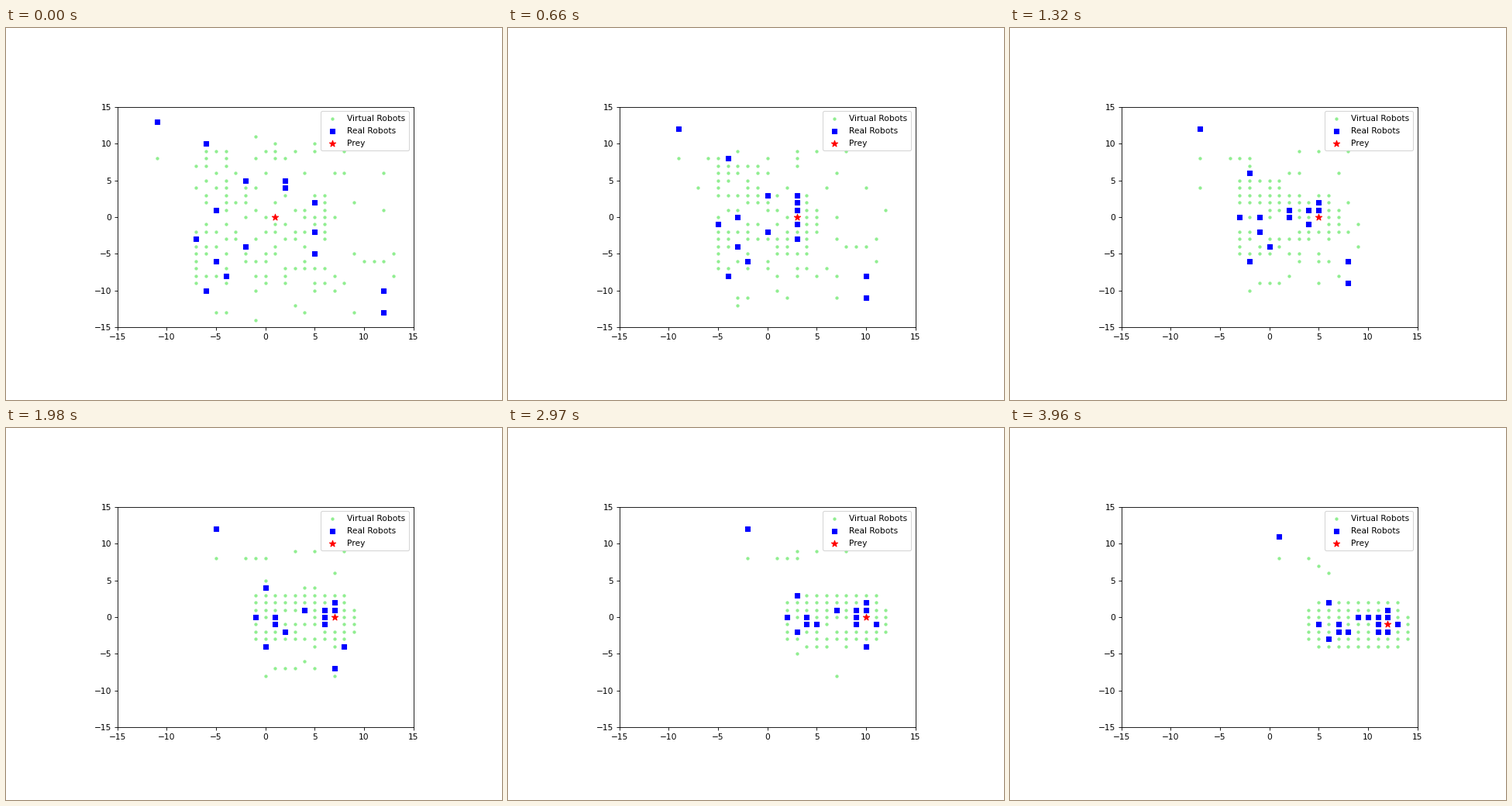
These frames come from a looping animation (640 by 480 pixels, 5950 ms). A matplotlib script:

```python
import matplotlib.pyplot as plt
import numpy as np
from matplotlib.animation import FuncAnimation

LOOP_MS = 5950
TICK_MS = 25
STEP_MS = 330
LAST = 12
S = 0.77  # the plot is drawn smaller than its default size

# Real robots: where they set out, and where they close in
ROBOT_START = [(-11, 13), (-6, 10), (-2, 5), (2, 5), (2, 4), (5, 2), (-5, 1),
               (5, -2), (5, -5), (-7, -3), (-2, -4), (-5, -6), (-4, -8),
               (-6, -10), (12, -10), (12, -13)]
ROBOT_END = [(1, 11), (6, 2), (9, 0), (12, 0), (12, 1), (11, 0), (7, -1),
             (11, -2), (11, -1), (5, -1), (10, 0), (7, -2), (8, -2),
             (6, -3), (13, -1), (12, -2)]

# Virtual robots that wait before they join the others
WAITING = [(3, 9), (5, 9), (8, 9), (7, 6), (7, -8), (12, 1), (-7, 4)]


def prey_at(k):
    return np.array([min(1 + k, 12), -1 if k == LAST else 0])


def grid(x0, x1, y0, y1):
    xs, ys = np.meshgrid(np.arange(x0, x1 + 1), np.arange(y0, y1 + 1))
    return np.column_stack([xs.ravel(), ys.ravel()])


def scattered(rng):
    """A busy middle with a thin scatter around it."""
    cells = grid(-7, 13, -14, 11)
    x, y = cells.T
    chance = np.where((x <= 6) & (np.abs(y) <= 9), 0.45, 0.08)
    return cells[rng.random(len(cells)) < chance]


def gathered(rng):
    """A rounded block of cells around the caught prey."""
    cells = grid(4, 14, -5, 3)
    x, y = cells.T
    inside = np.abs((x - 9) / 5.5) ** 4 + np.abs((y + 0.8) / 3.7) ** 4 < 1
    return cells[inside & (rng.random(len(cells)) < 0.9)]


def pick_slots(dots, slots):
    """Give each dot a near slot, spreading the dots over all slots."""
    used = np.zeros(len(slots))
    shift = prey_at(LAST) - prey_at(0)
    picked = []
    for dot in dots:
        gap = np.abs(slots - shift - dot).max(axis=1)
        best = np.argmin(gap + 4 * used)
        used[best] += 1
        picked.append(slots[best])
    return np.array(picked)


def chase(start, end):
    """Walk one cell per step towards a fixed place beside the moving prey."""
    pos, end = np.array(start), np.array(end)
    track = [pos]
    for k in range(1, LAST + 1):
        goal = end + prey_at(k) - prey_at(LAST)
        pos = pos + np.clip(goal - pos, -1, 1)
        track.append(pos)
    return track


def convoy_at(k):
    """The file of dots that trails in from the upper left."""
    gaps = (0, 1, 2, 5) if k > 1 else (0, 5)
    return [(k - 6 - g, min(8, 18 - k + g)) for g in gaps]


rng = np.random.default_rng(7)
swarm = scattered(rng)
SWARM = chase(swarm, pick_slots(swarm, gathered(rng)))
ROBOTS = chase(ROBOT_START, ROBOT_END)


def virtual_at(k):
    # the farther from the prey's row, the longer a dot waits
    waiting = [(x, y) for x, y in WAITING if k <= abs(y) + 1]
    return np.unique(np.vstack([SWARM[k], convoy_at(k)] +
                               ([waiting] if waiting else [])), axis=0)


plt.rcParams.update({
    "font.family": "DejaVu Sans",
    "font.size": 10 * S,
    "axes.linewidth": 0.8 * S,
    "patch.linewidth": 1.0 * S,
})

fig = plt.figure(figsize=(6.4, 4.8), dpi=100, facecolor="white")
ax = fig.add_axes([143.6 / 640, 93.7 / 480, 381.9 / 640, 284.6 / 480])
ax.set(xlim=(-15, 15), ylim=(-15, 15),
       xticks=range(-15, 16, 5), yticks=range(-15, 16, 5))
ax.tick_params(length=3.5 * S, width=0.8 * S, pad=3.5 * S)


def layer(color, marker, size, label):
    return ax.scatter([], [], s=(size * S) ** 2, c=color, marker=marker,
                      linewidths=S, label=label)


virtual = layer("lightgreen", "o", 3, "Virtual Robots")
real = layer("blue", "s", 5, "Real Robots")
prey = layer("red", "*", 8, "Prey")
ax.legend(loc="upper right", labelspacing=0.57, borderpad=0.43)


def draw(i):
    # a step begins on the tick nearest before its time
    k = min((i * TICK_MS + TICK_MS - 1) // STEP_MS, LAST)
    virtual.set_offsets(virtual_at(k))
    real.set_offsets(ROBOTS[k])
    prey.set_offsets([prey_at(k)])
    return virtual, real, prey


anim = FuncAnimation(fig, draw, frames=LOOP_MS // TICK_MS, interval=TICK_MS,
                     init_func=lambda: draw(0), repeat=True, repeat_delay=0)
plt.show()
```
